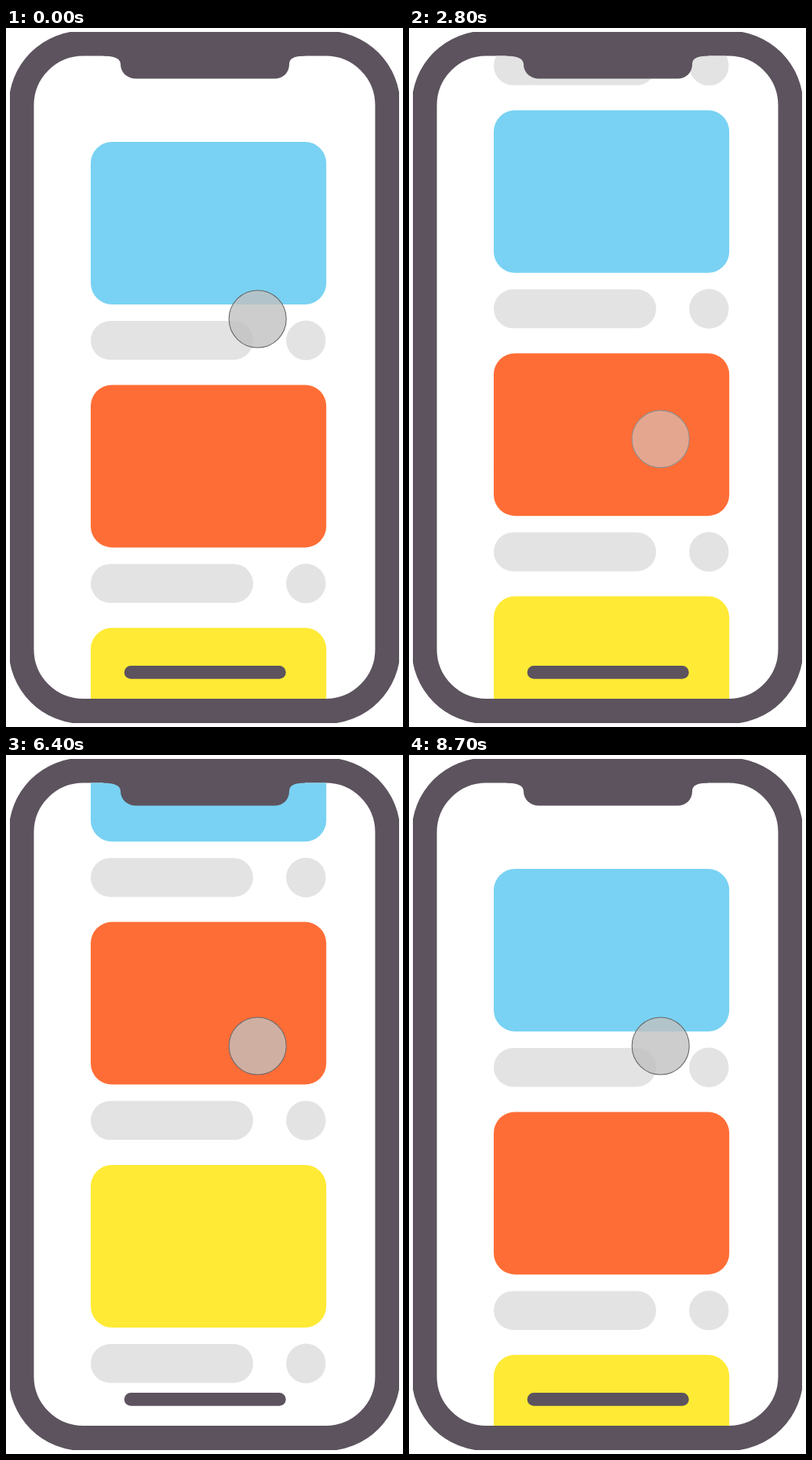
These frames come from a looping animation (506 px wide and 890 px high, 8900 ms). An HTML page:

```html
<!DOCTYPE html>
<html lang="en">
<head>
<meta charset="utf-8">
<title>Phone feed scrolling</title>
<style>
  html, body { margin: 0; width: 100%; height: 100%; overflow: hidden; background: #fff; }
  svg { display: block; width: 506px; height: 890px; }
</style>
</head>
<body>
<svg viewBox="0 0 506 890">
  <defs>
    <clipPath id="body"><rect x="5" y="5" width="496" height="880"/></clipPath>
    <clipPath id="screen"><rect x="35.5" y="35.5" width="435" height="818.5" rx="63"/></clipPath>
    <g id="caption" fill="#e3e3e3">
      <rect x="108" y="228" width="207" height="49.5" rx="24.75"/>
      <circle cx="382.3" cy="252.8" r="25.2"/>
    </g>
  </defs>
  <rect x="19.5" y="19.5" width="467" height="850.5" rx="79" fill="#fff" stroke="#5c535e" stroke-width="32" clip-path="url(#body)"/>
  <g clip-path="url(#screen)"><g id="feed"></g></g>
  <path fill="#5c535e" d="M124 35.5 C138 35.5 146 39 146 46 C146 57 155 64.5 166 64.5 H342 C353 64.5 361 57 361 46 C361 39 367 35.5 381 35.5 V30 H124 Z"/>
  <rect x="150.7" y="812" width="206" height="16.8" rx="8.4" fill="#5c535e"/>
  <circle id="finger" cx="320.7" r="36.5" stroke-width="1.1"/>
</svg>
<script>
const LOOP = 8900, STEP = 100, CARD_COUNT = 6, CARD_PITCH = 309.4;
const COLORS = ['#79d2f3', '#ff6d36', '#ffea35'];
const feed = document.getElementById('feed');
const finger = document.getElementById('finger');

feed.innerHTML = Array.from({ length: CARD_COUNT }, (_, i) => `
  <g transform="translate(0 ${i * CARD_PITCH})">
    <rect x="108" width="300.2" height="207" rx="27" fill="${COLORS[i % 3]}"/>
    <use href="#caption"/>
  </g>`).join('');

const expoOut = x => x >= 1 ? 1 : 1 - 2 ** (-10 * x);
const cubicInOut = x => x < 0.5 ? 4 * x ** 3 : 1 - 4 * (1 - x) ** 3;
const mix = (a, b, p) => a + (b - a) * p;

const START = { y: 370.5, scroll: 145, press: 1 };
// Each move runs from the pose before it to its own pose.
const MOVES = [
  { from: 0,    to: 2000, ease: expoOut,    y: 523.4, scroll: -3,     press: 1 },
  { from: 2350, to: 4050, ease: expoOut,    y: 523.4, scroll: -979.3, press: 0 },
  { from: 4250, to: 6100, ease: cubicInOut, y: 370.5, scroll: -1025,  press: 0 },
  { from: 6100, to: 6950, ease: expoOut,    y: 370.5, scroll: -1025,  press: 1 },
  { from: 6950, to: 7850, ease: expoOut,    y: 531.7, scroll: -268.2, press: 1 },
  { from: 7850, to: 8700, ease: expoOut,    ...START }
];

function poseAt(t) {
  let pose = START;
  for (const move of MOVES) {
    if (t < move.from) break;
    const p = move.ease(Math.min(1, (t - move.from) / (move.to - move.from)));
    pose = {
      y: mix(pose.y, move.y, p),
      scroll: mix(pose.scroll, move.scroll, p),
      press: mix(pose.press, move.press, p)
    };
  }
  return pose;
}

function draw(now) {
  const t = Math.floor((now % LOOP) / STEP) * STEP;
  const { y, scroll, press } = poseAt(t);
  const gray = value => `rgb(${value},${value},${value})`;
  feed.setAttribute('transform', `translate(0 ${scroll.toFixed(2)})`);
  finger.setAttribute('cy', y.toFixed(2));
  finger.setAttribute('fill', gray(Math.round(mix(213, 193, press))));
  finger.setAttribute('fill-opacity', mix(0.53, 0.8, press));
  finger.setAttribute('stroke', gray(Math.round(mix(150, 104, press))));
}

const begin = performance.now();
function tick() {
  draw(performance.now() - begin);
  requestAnimationFrame(tick);
}
tick();
</script>
</body>
</html>
```
